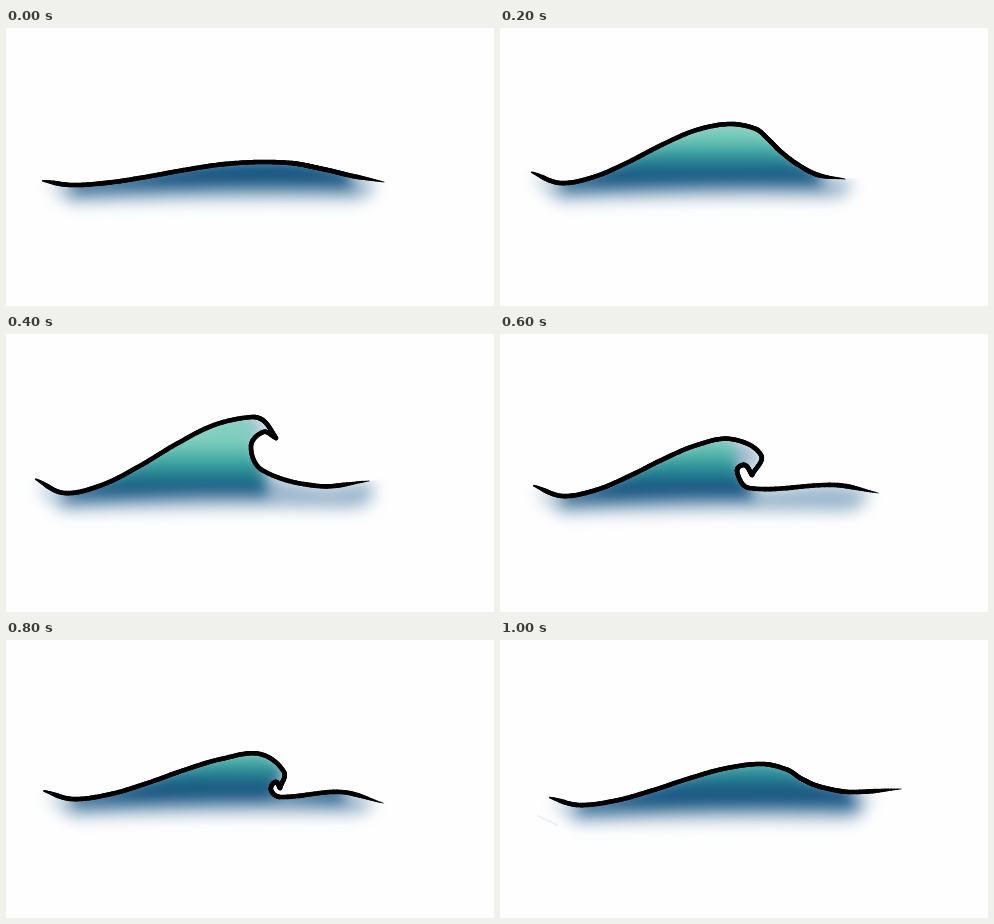
Write an HTML page with a canvas that moves like this. It is 488 by 278 pixels and loops after 1100 ms.

```html
<!DOCTYPE html>
<html lang="en">
<head>
<meta charset="utf-8">
<title>Wave</title>
<style>
html, body { margin: 0; width: 100%; height: 100%; overflow: hidden; background: #fefefe; }
canvas { display: block; }
</style>
</head>
<body>
<canvas id="stage" width="488" height="278"></canvas>
<script>
const STEP = 100, STEPS = 11;
const ctx = document.getElementById('stage').getContext('2d');

// Each pose: trough, crest, brow, lip, curl, floor, dip, end
const poses = [
  [0, '65,157 253,134 285,135 298,137 312,140 326,143 342,147 378,154'],
  [2, '60,155 230,96 256,101 268,111 280,123 297,136 318,147 345,151'],
  [4, '58,159 246,83 258,87 270,104 245,112 256,136 312,152 363,147'],
  [6, '62,162 231,105 261,121 252,141 237,137 249,154 335,151 378,159'],
  [8, '66,159 254,114 278,132 274,148 265,150 274,157 335,152 377,163'],
  [9, '74,163 268,122 292,134 291,141 288,147 298,153 338,153 403,165'],
  [10, '78,165 263,124 288,130 300,138 312,144 325,148 350,152 401,149']
].map(([step, text]) => ({ step, marks: text.split(' ').map(p => p.split(',').map(Number)) }));

const mid = (a, b) => [(a[0] + b[0]) / 2, (a[1] + b[1]) / 2];
const gap = (a, b) => Math.hypot(b[0] - a[0], b[1] - a[1]);
const ease = u => u * u * (3 - 2 * u);

// Steps without a pose lie halfway on a smooth path through the four nearest poses
function marksAt(step) {
  const i = poses.findIndex(p => p.step >= step);
  if (poses[i].step === step) return poses[i].marks;
  const near = k => poses[(i + k + poses.length) % poses.length].marks;
  const [a, b, c, d] = [-2, -1, 0, 1].map(near);
  return b.map((p, m) => p.map((v, axis) =>
    (9 * (v + c[m][axis]) - a[m][axis] - d[m][axis]) / 16));
}

function buildWave(marks) {
  const [trough, crest, brow, lip, curl, floor, dip, end] = marks;
  const height = trough[1] - crest[1];
  const hooked = lip[0] - curl[0] > 6;
  const tip = [trough[0] - 28, trough[1] - 0.18 * height];
  const slope = [0.2, 0.4, 0.6, 0.8].map(u =>
    [trough[0] + (crest[0] - trough[0]) * u, trough[1] - height * ease(u)]);
  const curlTop = mid(lip, curl);
  if (hooked) curlTop[1] = Math.min(lip[1], curl[1]) - 6;

  const back = [trough, ...slope, crest];
  const face = [tip, ...back, brow, lip];
  const rest = [curlTop, curl, floor, dip, end];
  const ink = hooked
    ? [...smooth(face), ...smooth([lip, ...rest]).slice(1)]
    : smooth([...face, ...rest]);

  // A tall hooked wave keeps its lip white
  const pale = hooked && height > 50;
  const body = pale ? [...back, curl, floor] : [...back, brow, lip, curl, floor, dip];
  return { ink, body, trough, crest, end, height };
}

// Smooth curve through points, tangents scaled to each chord
function smooth(pts) {
  const dir = pts.map((p, i) => {
    const a = pts[Math.max(i - 1, 0)], b = pts[Math.min(i + 1, pts.length - 1)];
    const d = gap(a, b) || 1;
    return [(b[0] - a[0]) / d, (b[1] - a[1]) / d];
  });
  const out = [pts[0]];
  for (let i = 1; i < pts.length; i++) {
    const a = pts[i - 1], b = pts[i], len = gap(a, b);
    for (let n = 1; n <= 16; n++) {
      const u = n / 16, v = 1 - u;
      out.push([0, 1].map(axis => a[axis] * ease(v) + b[axis] * ease(u)
        + len * u * v * (dir[i - 1][axis] * v - dir[i][axis] * u)));
    }
  }
  return out;
}

function trace(pts) {
  ctx.beginPath();
  pts.forEach(p => ctx.lineTo(p[0], p[1]));
}

function fillSoft(paint, blur) {
  ctx.closePath();
  ctx.filter = `blur(${blur}px)`;
  ctx.fillStyle = paint;
  ctx.fill();
}

function clipBelow({ ink, end }) {
  trace([[0, ink[0][1] - 8], ...ink, [430, end[1] - 10], [430, 278], [0, 278]]);
  ctx.clip();
}

function drawHaze({ ink, trough, end }) {
  const left = trough[0] - 23, right = Math.min(368, end[0] + 6), base = trough[1] + 17;
  const top = ink.filter(p => p[0] > left && p[0] < right);
  trace([[left, trough[1] - 2], ...top, [right, 155]]);
  ctx.quadraticCurveTo(right, base, right - 30, base - 2);
  ctx.quadraticCurveTo(220, base - 4, left + 22, base + 1);
  fillSoft('rgba(58, 112, 156, 0.5)', 8);
}

function drawBody({ body, trough, crest, height }) {
  const lift = 4, base = trough[1] + 5;
  const last = body[body.length - 1];
  const paint = ctx.createLinearGradient(0, 106, 0, crest[1] + 1.3 * height - 26);
  paint.addColorStop(0, '#82d0be');
  paint.addColorStop(0.35, '#4ab2a6');
  paint.addColorStop(0.72, '#217d90');
  paint.addColorStop(1, '#1b5782');
  trace([...body.map(p => [p[0], p[1] - lift]), [last[0] + 6, base - 2]]);
  ctx.quadraticCurveTo(210, base - 5, trough[0] + 2, base + 2);
  fillSoft(paint, 7);
}

function drawTrail() {
  ctx.strokeStyle = '#eef1f4';
  ctx.lineWidth = 2;
  trace([[38, 176], [57, 185]]);
  ctx.stroke();
}

function drawInk(path) {
  const total = path.reduce((sum, p, i) => i ? sum + gap(path[i - 1], p) : 0, 0);
  let done = 0;
  ctx.strokeStyle = '#000';
  ctx.lineCap = 'round';
  for (let i = 1; i < path.length; i++) {
    done += gap(path[i - 1], path[i]);
    const head = 0.35 + 0.65 * done / 14;
    const tail = 0.2 + 0.8 * (total - done) / 26;
    ctx.lineWidth = 4.6 * Math.min(1, head, tail);
    trace([path[i - 1], path[i]]);
    ctx.stroke();
  }
}

function draw(step) {
  const wave = buildWave(marksAt(step));
  ctx.fillStyle = '#fefefe';
  ctx.fillRect(0, 0, 488, 278);
  if (step >= 9) drawTrail();
  ctx.save();
  clipBelow(wave);
  drawHaze(wave);
  drawBody(wave);
  ctx.restore();
  drawInk(wave.ink);
}

let shown = -1;
const begin = performance.now();
function tick() {
  const step = Math.floor((performance.now() - begin) / STEP) % STEPS;
  if (step !== shown) draw(shown = step);
  requestAnimationFrame(tick);
}
tick();
</script>
</body>
</html>
```
